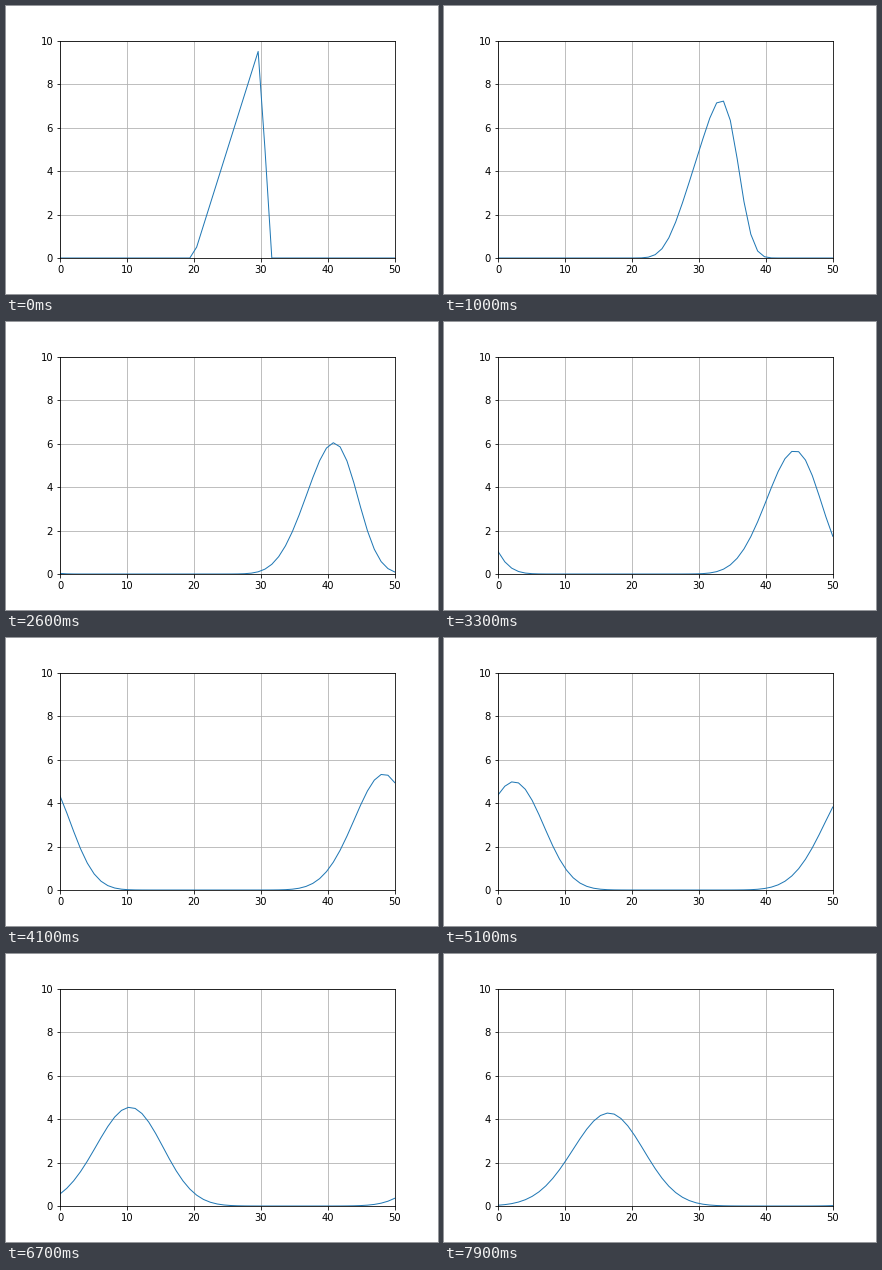
Recreate the animation shown at these times as a matplotlib script. Size 432 by 288 pixels, loop 8000 ms.

```python
import numpy as np
import matplotlib.pyplot as plt
from matplotlib.animation import FuncAnimation

N = 50         # grid points on a periodic domain
COURANT = 0.5  # fraction of a cell moved per step
FRAMES = 80

x = np.linspace(0, 50, N)


def solve(steps):
    """Advect a sawtooth with the first-order upwind scheme."""
    u = np.zeros(N)
    u[20:30] = np.arange(1, 11)
    history = []
    for _ in range(steps):
        u = u - COURANT * (u - np.roll(u, 1))
        history.append(u)
    return history


waves = solve(FRAMES)

fig = plt.figure(figsize=(6, 4), dpi=72, facecolor="white")
fig.subplots_adjust(left=0.125, right=0.9, bottom=0.125, top=0.88)
ax = fig.add_subplot()
ax.set(xlim=(0, 50), ylim=(0, 10))
ax.tick_params(labelsize=10)
ax.grid(True)
line, = ax.plot([], [], color="C0", lw=1)


def update(i):
    line.set_data(x, waves[i])
    return line,


anim = FuncAnimation(fig, update, frames=FRAMES, interval=100,
                     repeat=True, repeat_delay=0)
plt.show()
```
